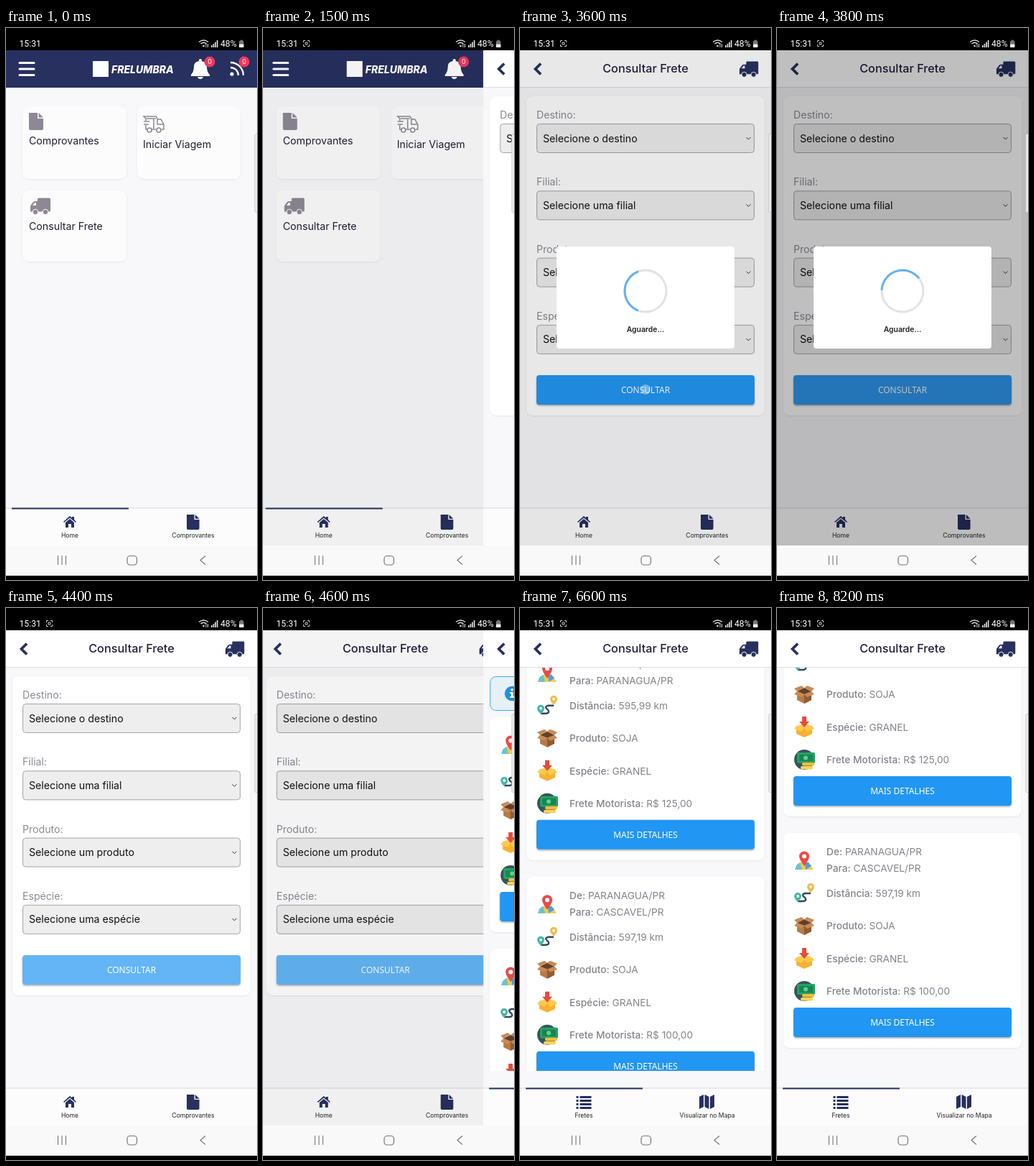
An HTML page for the animation above (8300 ms loop, 350 by 768 pixels).

```html
<!DOCTYPE html>
<html lang="pt-BR">
<head>
<meta charset="utf-8">
<style>
html, body { margin: 0; height: 100%; overflow: hidden; background: #000 }
svg { display: block; width: 350px; height: 768px; font-family: Inter, sans-serif }
.button { font-family: "Noto Sans", sans-serif }
.status { font-family: Roboto, sans-serif }
</style>
</head>
<body>
<svg id="stage" viewBox="0 0 350 768"></svg>
<script>
const NAVY = '#27305f', GREY = '#8d8894', BLUE = '#2196f3';
const LOOP = 8300, SLIDE = 463, MAX_SCROLL = 161;

const text = (x, y, s, size = 14.2, fill = '#211f33', extra = '') =>
  `<text x="${x}" y="${y}" font-size="${size}" fill="${fill}" ${extra}>${s}</text>`;
const middle = 'text-anchor="middle"';
const rect = (x, y, w, h, fill, r = 0, extra = '') =>
  `<rect x="${x}" y="${y}" width="${w}" height="${h}" rx="${r}" fill="${fill}" ${extra}/>`;
const circle = (x, y, r, fill, extra = '') => `<circle cx="${x}" cy="${y}" r="${r}" fill="${fill}" ${extra}/>`;
const path = (d, fill, extra = '') => `<path d="${d}" fill="${fill}" ${extra}/>`;
const line = (d, color, width, extra = '') =>
  path(d, 'none', `stroke="${color}" stroke-width="${width}" ${extra}`);
const at = (x, y, body, scale = 1) => `<g transform="translate(${x} ${y}) scale(${scale})">${body}</g>`;
const card = (x, y, w, h, fill = '#fff') => rect(x, y, w, h, fill, 9, 'filter="url(#soft)"');
const button = (y, label, id = '') =>
  rect(23, y, 304, 41, BLUE, 4, `filter="url(#drop)" ${id}`) +
  text(175, y + 25, label, 12, '#fff', `class="button" ${middle}`);

// Icons
const doc = c => path('M0 0H12V8H20V22Q20 24 18 24H2Q0 24 0 22ZM13.5 0L20 6.5H13.5Z', c);
const truck = c =>
  rect(10, .5, 18, 19, c, 1.5) + path('M11 5H6.5Q5 5 4 6L1 10Q0 11 0 12.5V19.5H11Z', c) +
  path('M8 7H6L3 11H8Z', '#fff') +
  [7, 21].map(x => circle(x, 20, 3.8, c, 'stroke="#fff" stroke-width="1"')).join('');
const van = line('M6 21H4V15M4 9V6L1 3H18L21 7H25L29 14V21H26M12 21H18M1 10H9M1 14H8M20 7V14H28M15 7V20M5 6H18', GREY, 1.5) +
  [9, 22].map(x => circle(x, 22, 3, '#fff', `stroke="${GREY}" stroke-width="1.6"`)).join('');
const house = path('M0 8L9 0L12 2.6V1H15V5L18 8L17 9L9 2.5L1 9ZM3 9L9 4L15 9V16H11V11H7V16H3Z', NAVY);
const list = [0, 5, 10, 15].map(y => rect(0, y, 3, 3, NAVY) + rect(5, y, 16, 3, NAVY)).join('');
const map = path('M0 3L6 0V17L0 20ZM7.5 0L13.5 3V20L7.5 17ZM15 3L21 0V17L15 20Z', NAVY);
const bell = path('M0 22Q4 18 4 11Q4 4 11 3V1Q13 -1 15 1V3Q22 4 22 11Q22 18 26 22V24H0ZM9 25H17Q16 28 13 28Q10 28 9 25Z', '#fff');
const feed = circle(3, 17, 2.6, '#fff') + line('M1 8A11 11 0 0 1 12 19M1 1A18 18 0 0 1 19 19', '#fff', 2.4);
const badge = x => circle(x, 47, 7.5, '#ef3760') + text(x, 50.2, '0', 9, '#fff', middle);
const pin = path('M2 20L7 16H19L26 26H0Z', '#f6c94b') + path('M2 20L7 16L10 26H0Z', '#68c3d5') +
  path('M14 16H19L23 21L15 26Z', '#4f9ee0') +
  path('M13 21Q6 12 6 7.5A7 7 0 0 1 20 7.5Q20 12 13 21Z', '#e64b48') + circle(13, 7.5, 3, '#fff');
const road = line('M5 24H13Q18 23 15 19Q9 15 15 13H23', '#35475b', 2.4) +
  path('M5 25Q0 20 0 17A5 5 0 0 1 10 17Q10 20 5 25Z', '#45b5a4') + circle(5, 17, 2, '#fff') +
  path('M23 12Q18 7 18 4A5 5 0 0 1 28 4Q28 7 23 12Z', '#f2bb4c') + circle(23, 4, 2, '#fff');
const crate = path('M4 9L14 13L24 9V21L14 26L4 21Z', '#b77a45') + path('M14 13L24 9V21L14 26Z', '#935b32') +
  path('M4 9L14 4L24 9L14 13Z', '#64402a') +
  path('M4 9L0 13L10 17L14 13ZM24 9L28 13L18 17L14 13ZM4 9L0 5L10 1L14 4ZM24 9L28 5L18 1L14 4Z', '#c88b55');
const parcel = path('M3 13H25V24L14 29L3 24Z', '#f8b12f') + path('M3 13L0 17L10 21L14 16L18 21L28 17L25 13L14 10Z', '#ffca4c') +
  path('M11 0H17V7H21L14 15L7 7H11Z', '#e64b3c');
const money = circle(14, 14, 14, '#35545b') + rect(4, 4, 25, 15, '#27a163', 2) +
  rect(7, 7, 19, 9, '#168652', 1) + circle(16, 11.5, 3, '#5fd08e') +
  rect(11, 18, 17, 4.5, '#f5bd38', 2) + rect(9, 23, 17, 4.5, '#f9d35c', 2);

const footer = (left, leftLabel, right, rightLabel, active) =>
  rect(0, 668, 350, 52, '#fcfcfd') + rect(0, 667.5, 350, 1, '#d9d9df') +
  (active ? rect(8, 667.5, 163, 2, NAVY) : '') + left + right +
  text(89, 709, leftLabel, 8.6, '#222', middle) + text(261, 709, rightLabel, 8.6, '#222', middle);
const homeFooter = active => footer(at(80, 679, house), 'Home', at(252, 677, doc(NAVY), .88), 'Comprovantes', active);
const page = (id, body) => `<g id="${id}">${rect(0, 31, 350, 689, '#f8f8fa')}${body}</g>`;
const titleBar = rect(0, 31, 350, 51, '#fff') + rect(0, 82, 350, 1, '#dedee3') +
  line('M29 49.5L21.5 57L29 64.5', NAVY, 3.8) +
  text(175, 62, 'Consultar Frete', 16.3, '#211f3d', `${middle} font-weight="500"`) + at(306, 46, truck(NAVY), .94);

const home = page('home',
  rect(0, 31, 350, 52, NAVY) +
  [48.5, 57, 65.5].map(y => line(`M19 ${y}H39`, '#fff', 3, 'stroke-linecap="round"')).join('') +
  rect(121, 46, 22, 22, '#fff') +
  text(147, 63, 'FRELUMBRA', 14, '#fff', 'font-weight="800" font-style="italic"') +
  at(258, 43, bell) + badge(284) + at(312, 47, feed) + badge(332) +
  card(23, 109, 145, 101, '#fcfcfc') + card(183, 109, 144, 101, '#fcfcfc') + card(23, 226, 145, 99, '#fcfcfc') +
  at(32, 118, doc(GREY)) + at(191, 120, van) + at(34, 236, truck(GREY)) +
  text(32, 162, 'Comprovantes') + text(191, 167, 'Iniciar Viagem') + text(32, 281, 'Consultar Frete') +
  homeFooter(true));

const field = (label, hint, i) => at(0, i * 93.3,
  text(23, 126, label, 14.1, GREY) +
  rect(23.5, 133.5, 303, 40, '#eee', 4, 'stroke="#a5a5a8"') +
  text(32, 158.5, 'Selecione ' + hint, 14.2, '#111') +
  line('M315.5 152L318.5 155L321.5 152', '#333', 1));
const form = page('form',
  titleBar + card(9, 95, 332, 444) + field('Destino:', 'o destino', 0) +
  `<g id="details">${field('Filial:', 'uma filial', 1)}${field('Produto:', 'um produto', 2)}
  ${field('Espécie:', 'uma espécie', 3)}${button(483, 'CONSULTAR', 'id="consult"')}</g>` +
  homeFooter(false));

const freight = (y, from, to, km, price) => {
  const rows = [['De', from, 31], ['Para', to, 54], ['Distância', km + ' km', 89], ['Produto', 'SOJA', 134],
    ['Espécie', 'GRANEL', 180], ['Frete Motorista', 'R$ ' + price, 225]];
  return at(0, y, card(9, 0, 332, 299) +
    rows.map(([label, value, dy]) =>
      text(69, dy, `<tspan font-weight="500">${label}:</tspan> ${value}`, 13.7, '#85828b')).join('') +
    [[pin, 25, 25], [road, 24, 71], [crate, 24, 116], [parcel, 24, 160], [money, 24, 206]]
      .map(([icon, x, dy]) => at(x, dy, icon)).join('') +
    button(243, 'MAIS DETALHES'));
};
const results = page('results',
  `<g clip-path="url(#view)"><g id="scroller">` +
  rect(9.5, 95.5, 331, 47, '#e5f1f6', 8, 'stroke="#42abdf"') + circle(40, 119, 10.3, '#1f91da') +
  circle(40, 113.7, 1.8, '#fff') + path('M37 117H41.5V123H43V125H37V123H38.5V119H37Z', '#fff') +
  text(59, 123.5, '2 fretes encontrados', 12.3, '#2496dc') +
  freight(152, 'CASCAVEL/PR', 'PARANAGUA/PR', '595,99', '125,00') +
  freight(474, 'PARANAGUA/PR', 'CASCAVEL/PR', '597,19', '100,00') +
  '</g></g>' + titleBar +
  footer(at(78.5, 679, list), 'Fretes', at(250, 677, map), 'Visualizar no Mapa', true));

const loading = `<g id="loading">${rect(51, 304, 248, 142, '#fff', 4)}
  ${circle(175, 366, 29, 'none', 'stroke="#e2e2e5" stroke-width="3"')}
  <g id="spinner">${line('M165 338.8A29 29 0 0 0 165 393.2', '#64b1f0', 3)}</g>
  ${text(175, 423, 'Aguarde...', 10.4, '#222', `${middle} font-weight="600"`)}</g>`;

const statusBar = rect(0, 0, 350, 31, '#000') +
  text(18.5, 26, '15:31', 12.2, '#fff', 'class="status"') + text(299, 26, '48%', 12.2, '#fff', 'class="status"') +
  `<g id="capture">${line('M56.5 20V17.5H59M62 17.5H64.5V20M64.5 23V25.5H62M59 25.5H56.5V23M59 20H62V23H59Z', '#ccc', 1)}</g>` +
  line('M269 19.5Q275.5 14.5 282 19.5M271.5 22Q275.5 18.5 279.5 22', '#ddd', 1.4) + circle(275.5, 25, 1.3, '#ddd') +
  line('M279 22V27M281.5 22V27', '#ddd', 1) +
  [3, 5, 7.5, 10].map((h, i) => rect(286 + i * 2.6, 27 - h, 1.7, h, '#ddd')).join('') +
  rect(325, 18, 6.5, 9, '#777', 1) + rect(326.5, 16.7, 3.5, 2, '#777') + rect(325, 22.5, 6.5, 4.5, '#eee', 1);
const systemBar = rect(0, 720, 350, 42, '#f9f9f9') + rect(0, 762, 350, 6, '#000') +
  line('M72.5 734V747M78 734V747M83.5 734V747', '#77777a', 1.1) +
  rect(169, 734.5, 13.5, 12.5, 'none', 4, 'stroke="#77777a" stroke-width="1.2"') +
  line('M278 734.5L271 740.5L278 746.5', '#77777a', 1.2);

const $ = id => document.getElementById(id);
$('stage').innerHTML = `<defs>
  <filter id="soft" x="-5%" y="-5%" width="110%" height="112%"><feDropShadow dx="0" dy="1" stdDeviation="1.3" flood-opacity=".08"/></filter>
  <filter id="drop" x="-5%" y="-10%" width="110%" height="135%"><feDropShadow dx="0" dy="1.5" stdDeviation="1.3" flood-opacity=".35"/></filter>
  <clipPath id="view"><rect y="83" width="350" height="561"/></clipPath></defs>
  ${home}${form}${rect(0, 31, 350, 689, '#000', 0, 'id="shade"')}
  ${results}${loading}${circle(175, 503, 7, '#fff', 'id="touch" opacity=".35"')}
  ${rect(347, 147.5, 6, 109, '#f0f0f2', 2, 'stroke="#bbb" stroke-width=".8"')}
  ${systemBar}${statusBar}`;

const stage = $('stage'), shade = $('shade');
const ramp = (t, from, to) => Math.max(0, Math.min(1, (t - from) / (to - from)));
const smooth = p => p * p * (3 - 2 * p);
const show = (id, on) => $(id).setAttribute('display', on ? 'inline' : 'none');
const move = (id, x, y = 0) => $(id).setAttribute('transform', `translate(${x} ${y})`);
const slide = (t, from) => smooth(ramp(t, from, from + SLIDE));
const slideShade = p => p < 1 ? .1 * Math.min(1, p * 4) : 0;

function draw(t) {
  const toForm = slide(t, 1400), toResults = slide(t, 4500);
  move('home', -35 * toForm);
  move('form', 350 * (1 - toForm) - 35 * toResults);
  move('results', 350 * (1 - toResults));
  show('home', toForm < 1);
  show('form', toForm > 0 && toResults < 1);
  show('details', toForm === 1);
  show('results', toResults > 0);

  const dim = t >= 3600 ? (.09 + .16 * ramp(t, 3600, 3800)) * (1 - ramp(t, 4250, 4400)) : 0;
  stage.insertBefore(shade, t < 3000 ? $('form') : $('results'));
  shade.setAttribute('opacity', dim || slideShade(t < 3000 ? toForm : toResults));
  show('loading', t >= 3600 && t < 4350);
  show('touch', t >= 3600 && t < 3800);
  $('spinner').setAttribute('transform', `rotate(${(t - 3600) * .36} 175 366)`);
  const press = ramp(t, 3700, 4200);
  $('consult').setAttribute('fill', `rgb(${33 + 67 * press},${150 + 31 * press},${243 + 3 * press})`);

  const scroll = MAX_SCROLL * (1 - Math.cos(Math.PI * ramp(t, 5400, 7475))) / 2;
  move('scroller', 0, -scroll);
  show('capture', t >= 200);
}

const start = performance.now();
function tick() {
  draw((performance.now() - start) % LOOP);
  requestAnimationFrame(tick);
}
tick();
</script>
</body>
</html>
```
